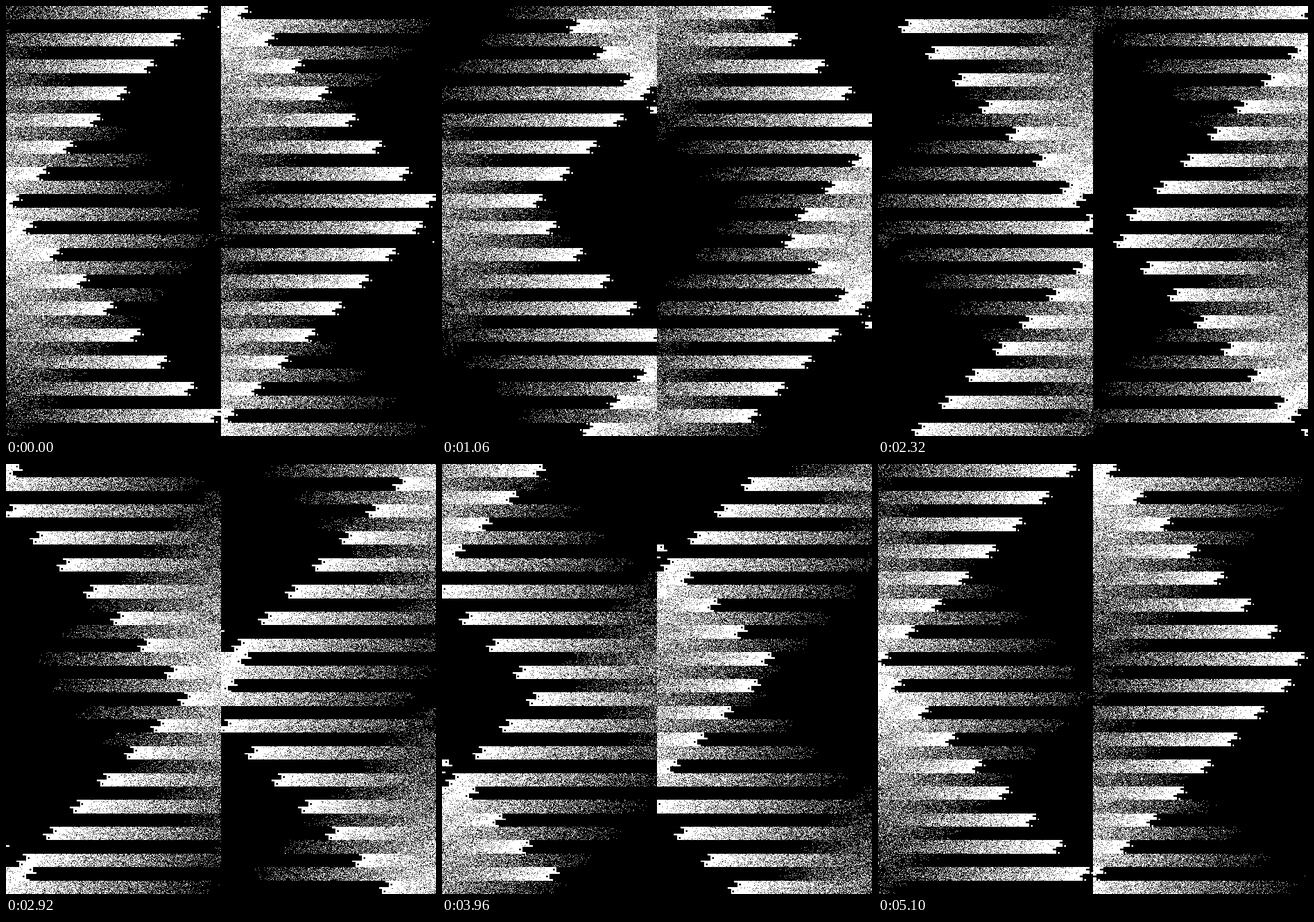
An HTML page with a canvas that plays this animation: 748x748 px, repeating every 5.12 s.

```html
<!DOCTYPE html>
<html lang="en">
<head>
<meta charset="utf-8">
<title>Grain loops</title>
<style>
html, body { margin: 0; width: 100%; height: 100%; overflow: hidden; background: #000; }
canvas { display: block; }
</style>
</head>
<body>
<canvas id="stage" width="748" height="748"></canvas>
<script>
const SIZE = 748, GRID = 256, STEP = 20, LOOP = 5120;
const ctx = document.getElementById('stage').getContext('2d');
const image = ctx.createImageData(SIZE, SIZE);
const pixels = new Uint32Array(image.data.buffer);
const birth = new Uint8Array(SIZE * SIZE);
const life = new Uint8Array(SIZE * SIZE);

let seed = 12345;
function random() {
  seed = (seed + 0x6D2B79F5) | 0;
  let h = Math.imul(seed ^ (seed >>> 15), seed | 1);
  h ^= h + Math.imul(h ^ (h >>> 7), h | 61);
  return ((h ^ (h >>> 14)) >>> 0) / 4294967296;
}

// Order of the cells along one of the four lines of a head. Odd lines swap
// neighbours, which leaves the loose dot and the notch; even lines move in pairs.
function linePlace(along, line) {
  if (line === 3) return along ^ 1;
  return line === 1 ? (along ^ 1) + 3 : (along | 1) + 1;
}

// Phase at which the head reaches a cell. Each pair of rows is a closed
// track: right along the upper row, back left along the lower one.
function birthPhase(x, y) {
  const back = (y >> 3) & 1;
  const pair = (y >> 4) & 7;
  const rising = (x >> 7) === (y >> 7);
  const lower = (y >> 2) & 1;
  const along = back ? 127 - (x & 127) : x & 127;
  let start = rising ? 119 - 16 * pair : 15 + 16 * pair;
  if (back) start += rising ? 8 : -8;
  if (lower !== back) start -= 4;
  const line = back ? 3 - (y & 3) : y & 3;
  return (linePlace(along, line) - start + 128 * back) & 255;
}

const cell = v => Math.floor((v + 0.5) * GRID / SIZE);
for (let y = 0, i = 0; y < SIZE; y++) {
  for (let x = 0; x < SIZE; x++, i++) {
    birth[i] = birthPhase(cell(x), cell(y));
    life[i] = 4 + 128 * random();
  }
}

let shown = -1;
function draw() {
  const phase = Math.max(1, Math.floor(performance.now() % LOOP / STEP));
  if (phase !== shown) {
    shown = phase;
    for (let i = 0; i < pixels.length; i++) {
      pixels[i] = ((phase - birth[i]) & 255) < life[i] ? 0xffffffff : 0xff000000;
    }
    ctx.putImageData(image, 0, 0);
  }
  requestAnimationFrame(draw);
}
draw();
</script>
</body>
</html>
```
